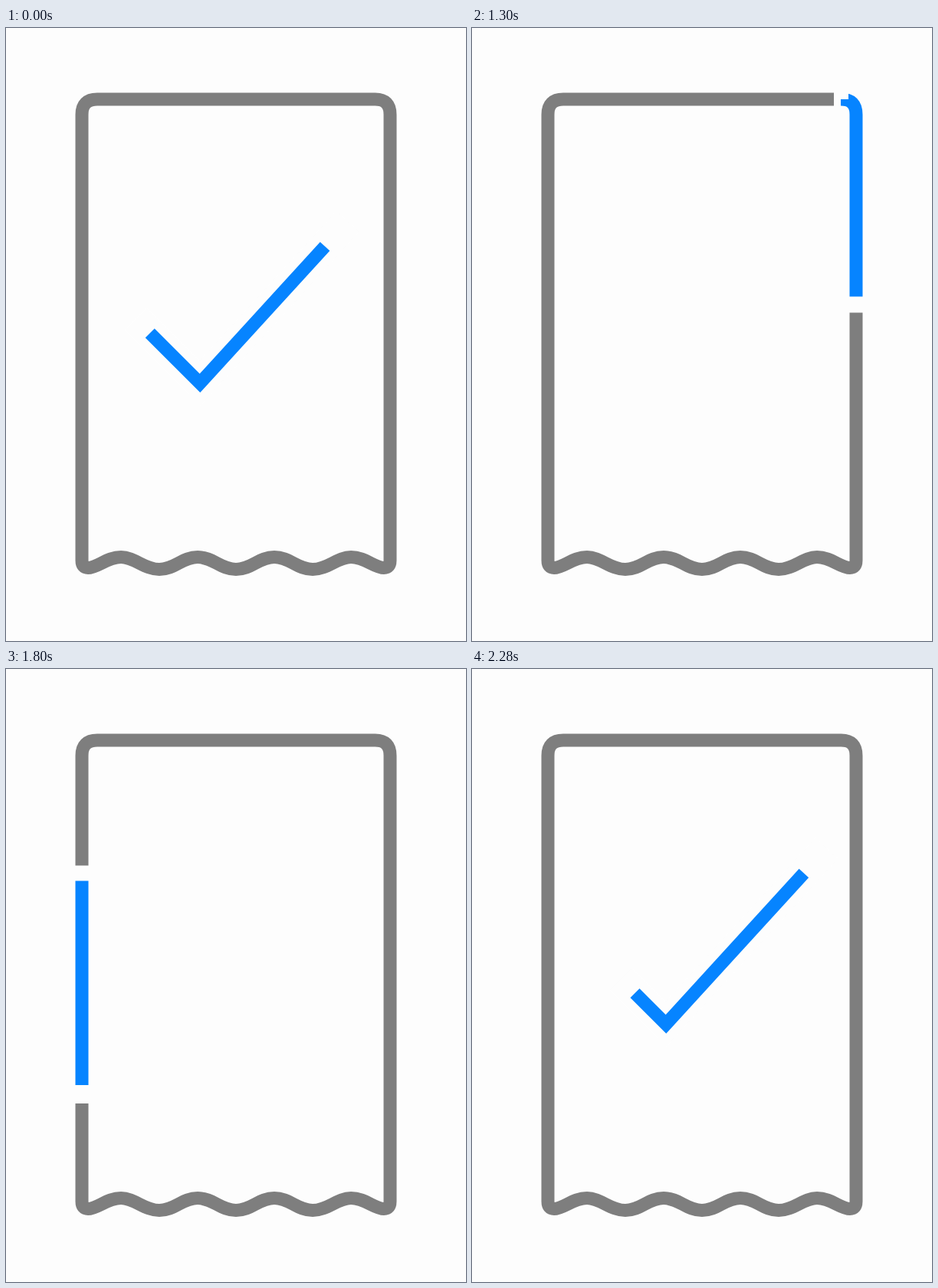
These frames come from a looping animation (600x800 px, 2300 ms). An HTML page:

```html
<!DOCTYPE html>
<html lang="en">
<head>
<meta charset="utf-8">
<title>Receipt check</title>
<style>
  html, body { margin: 0; width: 100%; height: 100%; overflow: hidden; background: #fdfdfd; }
  svg { display: block; width: 100vw; height: 100vh; }
  path { fill: none; stroke-width: 17; }
  .wide { stroke-width: 40; }
  .blue { stroke: #0684ff; }
</style>
</head>
<body>
<svg viewBox="0 0 600 800">
  <defs>
    <path id="receipt" d="M119 93H481.500Q501 93 501 113V695Q501 704.500 493 704.500
      C481 704.500 468 690.500 450 690.500S420 706.500 400 706.500S370 690.500 350 690.500
      S320 706.500 300 706.500S270 690.500 250 690.500S220 706.500 200 706.500
      S168 690.500 150 690.500S119 704.500 107 704.500Q99 704.500 99 695V113Q99 93 119 93Z"/>
    <mask id="window" maskUnits="userSpaceOnUse" x="0" y="0" width="600" height="800">
      <path id="reveal" class="wide" stroke="#fff"/>
    </mask>
  </defs>
  <use href="#receipt" stroke="#7e7e7e"/>
  <path id="gap" class="wide" stroke="#fdfdfd"/>
  <g mask="url(#window)"><use href="#receipt" class="blue"/></g>
  <path id="check" class="blue"/>
</svg>
<script>
const LOOP = 2300, HOLD = 920, STEP = 20;
const $ = id => document.getElementById(id);

// The route enters at the right edge, draws the check, circles the receipt and checks again.
const tick = 'M501 192L253 463.5L99 309.5';
const lap = 'V93H501V698H99V93H501V192';
const TICK_LEN = 585.5, CYCLE = 3317;
$('check').setAttribute('d', tick);
$('reveal').setAttribute('d', 'M99 309.5' + lap);
$('gap').setAttribute('d', tick + lap + 'L253 463.5L99 309.5');

// Distances along the route at the key times
const times = [0, 380, 580, 880, 1100, 1360, 1380];
const head = [530, 1461.5, 1942.5, 2632.5, 3111.5, 3742, 3777];
const tail = [202, 1194, 1676, 2366, 2824, 3418, 3443];
const headGap = [22, 21, 19, 20, 26, 26, 26];
const tailGap = [19, 19, 21, 24, 42, 44, 44];

function curve(values, t) {
  const last = times.length - 1;
  if (t >= times[last]) return values[last];
  const i = times.findIndex(k => k > t) - 1;
  const slope = k => {
    const a = Math.max(k - 1, 0), b = Math.min(k + 1, last);
    return (values[b] - values[a]) / (times[b] - times[a]);
  };
  const span = times[i + 1] - times[i], x = (t - times[i]) / span;
  const ease = x * x * (3 - 2 * x);
  return values[i] + (values[i + 1] - values[i]) * ease
    + span * x * (1 - x) * (slope(i) * (1 - x) - slope(i + 1) * x);
}

function show(id, from, to) {
  const a = Math.max(from, 0), b = Math.max(to, a);
  $(id).style.visibility = b > a ? 'visible' : 'hidden';
  $(id).setAttribute('stroke-dasharray', `0 ${a} ${b - a} 9999`);
}

function draw(now) {
  const time = Math.floor(now % LOOP / STEP) * STEP;
  const t = (time + LOOP - HOLD) % LOOP;
  const a = curve(tail, t), b = curve(head, t);
  const shift = t > 700 ? CYCLE : 0;
  show('check', a - shift, b - shift);
  show('reveal', a - TICK_LEN, b - TICK_LEN);
  show('gap', a - curve(tailGap, t), b + curve(headGap, t));
}

let start;
function frame(now) {
  start ??= now;
  draw(now - start);
  requestAnimationFrame(frame);
}
draw(0);
requestAnimationFrame(frame);
</script>
</body>
</html>
```
